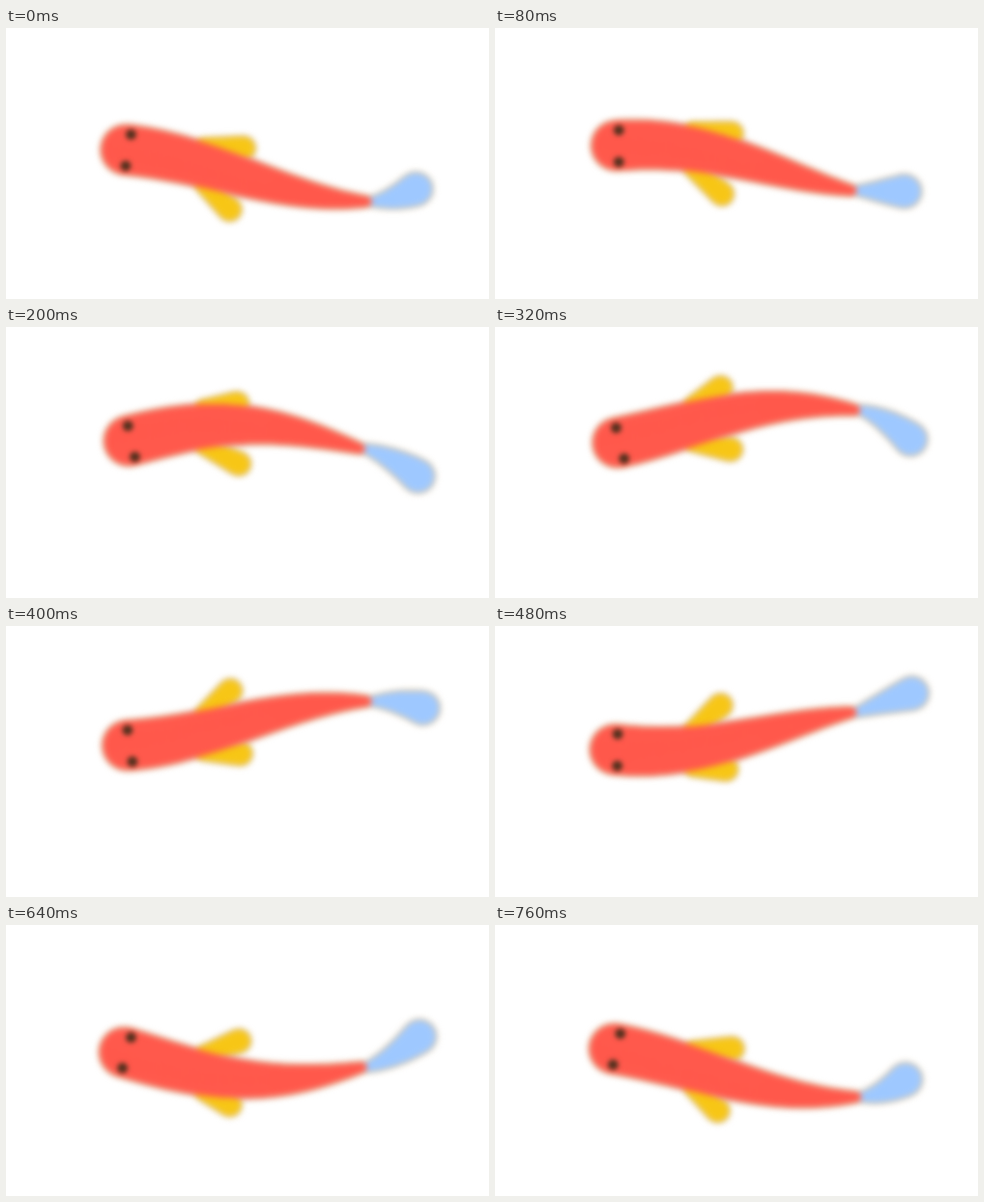
Animation of 500 by 281 pixels, one loop 0.8 s. Source, as an HTML page with a canvas:

```html
<!DOCTYPE html>
<html lang="en">
<head>
<meta charset="utf-8">
<title>Swimming fish</title>
<style>
html, body { margin: 0; width: 100%; height: 100%; overflow: hidden; background: #fff; }
canvas { display: block; width: 100%; height: 100%; }
</style>
</head>
<body>
<canvas id="stage" width="500" height="281"></canvas>
<script>
const W = 500, H = 281, LOOP = 800, STEP = 40;
const RED = '#ff594c', YELLOW = '#f7c616', BLUE = '#9ec8ff';
const HALO = 'rgba(216, 188, 146, 0.7)', EYE = 'rgba(66, 44, 26, 0.9)';
const HEAD = 125, TAIL = 371;

const stage = document.getElementById('stage').getContext('2d');
const sheet = document.createElement('canvas');
sheet.width = W;
sheet.height = H;
const ink = sheet.getContext('2d');

const mix = (a, b, u) => a + (b - a) * u;

// Sway around a centre; peak is the angle of the loop, in degrees, where it is largest
const sway = (turn, mid, size, peak) => mid + size * Math.cos((turn - peak) * Math.PI / 180);

// The body wave grows and lags towards the tail
function spine(x, turn) {
  const u = (x - HEAD) / (TAIL - HEAD);
  const size = 7 + 44 * Math.sin(Math.min(u, 1) * Math.PI / 2);
  return sway(turn, 125 + 4 * u, size, mix(-80, -3, u));
}

function dot(x, y, r) {
  ink.beginPath();
  ink.arc(x, y, r, 0, 7);
  ink.fill();
}

// Tapered drop from a narrow root to a round tip
function drop(x0, y0, r0, x1, y1, r1, bend = 0) {
  for (let u = 0; u <= 1; u += 0.02)
    dot(mix(x0, x1, u), mix(y0, y1, u) + 4 * bend * u * (1 - u), mix(r0, r1, u));
}

function sideFins(turn, grow) {
  const root = spine(202, turn), base = spine(220, turn);
  drop(204, root - 19, 8 + grow, sway(turn, 240, 7, 0), base + sway(turn, -31, 12, 45), 11.5 + grow);
  drop(204, root + 20, 8 + grow, sway(turn, 238, 7, 145), base + sway(turn, 34, 10, 40), 11.5 + grow);
}

function tailFin(turn, grow) {
  const x = sway(2 * turn, TAIL + 5, 4, 330);
  const tipX = sway(turn, 429, 4, 200);
  const tipY = sway(turn, 126, 50, 36) + sway(2 * turn, 0, 7, 270);
  drop(x, spine(TAIL, turn), 4.5 + grow, tipX, tipY, 17 + grow, sway(turn, 0, 4, 310));
}

function body(turn, grow) {
  const from = sway(turn, 124.7, 2.5, 110), to = sway(2 * turn, TAIL, 4, 330);
  for (let u = 0; u <= 1; u += 0.004)
    dot(mix(from, to, u), spine(mix(HEAD, TAIL, u), turn), mix(25.3, 5, u ** 1.8) + grow);
}

function eyes(turn) {
  const x = sway(turn, 127.5, 2.5, 110), y = spine(HEAD, turn) + 0.5;
  const tilt = Math.atan2(spine(180, turn) - y, 180 - HEAD);
  for (const side of [-16.5, 16.5])
    dot(x - side * Math.sin(tilt), y + side * Math.cos(tilt), 5.5);
}

function layer(color, blur, turn, grow, ...parts) {
  ink.clearRect(0, 0, W, H);
  ink.fillStyle = color;
  for (const part of parts) part(turn, grow);
  stage.filter = `blur(${blur}px)`;
  stage.drawImage(sheet, 0, 0);
  stage.filter = 'none';
}

// Solid black first, tinted by the blur pass, would double up; the halo is one even wash
function drawFish(turn) {
  stage.fillStyle = '#fff';
  stage.fillRect(0, 0, W, H);
  stage.globalAlpha = 0.7;
  layer('rgb(216, 188, 146)', 3.5, turn, 1.5, sideFins, tailFin, body);
  stage.globalAlpha = 1;
  layer(YELLOW, 3, turn, 0, sideFins);
  layer(BLUE, 3, turn, 0, tailFin);
  layer(RED, 3, turn, 0, body);
  layer(EYE, 2.8, turn, 0, eyes);
}

const start = performance.now();
let shown = -1;

function tick() {
  const n = Math.floor((performance.now() - start) % LOOP / STEP);
  if (n !== shown) {
    drawFish(n * STEP / LOOP * 360);
    shown = n;
  }
  requestAnimationFrame(tick);
}
tick();
</script>
</body>
</html>
```
